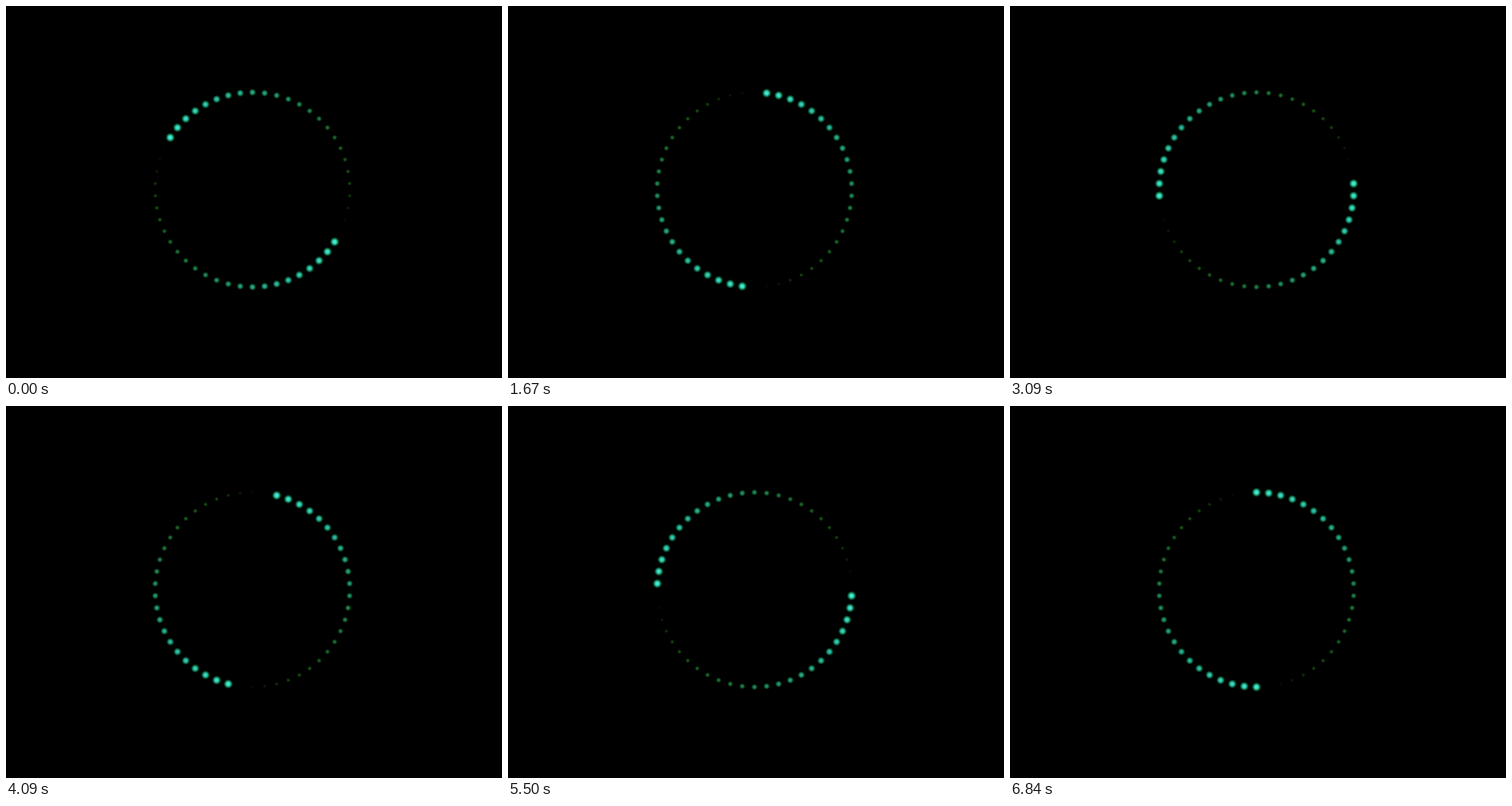
Write an HTML page with a canvas that moves like this. It is 640x480 px and loops after 6.93 s.

```html
<!DOCTYPE html>
<html lang="en">
<head>
<meta charset="utf-8">
<title>Ring of lights</title>
<style>
  html, body { margin: 0; width: 100%; height: 100%; overflow: hidden; background: #000; }
  canvas { display: block; }
</style>
</head>
<body>
<canvas id="stage" width="640" height="480"></canvas>
<script>
const ctx = document.getElementById('stage').getContext('2d');
const LOOP = 6930;
const LAST_STEP = 82;
const DOTS = 50;
const HALF = DOTS / 2;
const CENTER = { x: 318, y: 237 };
const RADIUS = 125.6;
const HEAD_START = 16.65;
const HEAD_SPEED = 0.82; // dots per step, counter-clockwise

const lerp = (a, b, k) => a + (b - a) * k;

// Glow colours from nearly faded to fully lit
const SHADES = [[14, 30, 0], [30, 84, 18], [36, 138, 92], [46, 192, 172], [72, 250, 228]];

function shade(level) {
  const pos = level * (SHADES.length - 1);
  const i = Math.min(Math.floor(pos), SHADES.length - 2);
  return SHADES[i].map((c, k) => lerp(c, SHADES[i + 1][k], pos - i));
}

const rgba = ([r, g, b], alpha = 1) =>
  `rgba(${Math.round(r)},${Math.round(g)},${Math.round(b)},${alpha})`;

function drawDot(x, y, level) {
  const size = lerp(2.2, 6.6, level);
  const [r, g, b] = shade(level);
  const alpha = Math.min(1, level * 6);
  const glow = ctx.createRadialGradient(x, y, 0, x, y, size);
  glow.addColorStop(0, rgba([r, g, b], alpha));
  glow.addColorStop(0.34, rgba([r * 0.82, g * 0.9, b * 0.88], alpha));
  glow.addColorStop(0.62, rgba([r * 0.3, g * 0.48, b * 0.38], alpha));
  glow.addColorStop(0.82, rgba([0, g * 0.2, b * 0.08], alpha));
  glow.addColorStop(1, 'rgba(0,0,0,0)');
  ctx.fillStyle = glow;
  ctx.fillRect(x - size, y - size, size * 2, size * 2);
}

function draw(time) {
  // Twelve steps per second, on a 10 ms clock
  const step = Math.min(LAST_STEP, Math.floor(Math.floor(time / 10) * 3 / 25));
  const head = HEAD_START - HEAD_SPEED * step;
  ctx.fillStyle = '#000';
  ctx.fillRect(0, 0, 640, 480);
  for (let i = 0; i < DOTS; i++) {
    const angle = i / DOTS * Math.PI * 2;
    const age = (((i - head) % HALF) + HALF) % HALF;
    drawDot(
      CENTER.x + RADIUS * Math.sin(angle),
      CENTER.y - RADIUS * Math.cos(angle),
      1 - age / HALF
    );
  }
}

const start = performance.now();
function tick() {
  draw((performance.now() - start) % LOOP);
  requestAnimationFrame(tick);
}
tick();
</script>
</body>
</html>
```
